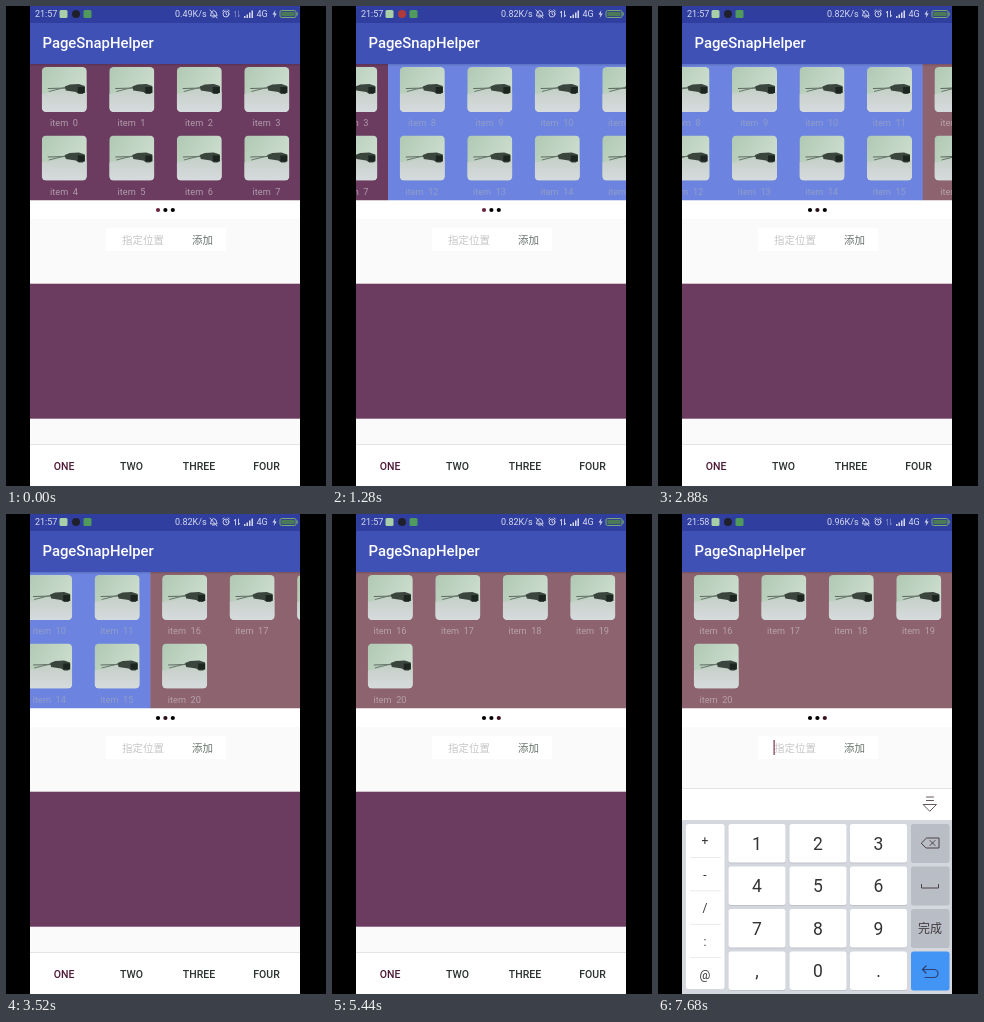
These frames come from a looping animation (320x480 px, 8 s). An HTML page:

```html
<!DOCTYPE html>
<html lang="zh">
<head>
<meta charset="utf-8">
<title>PageSnapHelper</title>
<style>
html, body { margin: 0; width: 100%; height: 100%; overflow: hidden; background: #000; }
svg { display: block; width: 100%; height: 100%; }
text { font-family: Roboto, "Noto Sans CJK SC", "Noto Sans CJK", sans-serif; }
.mid { text-anchor: middle; }
.line { fill: none; stroke-linecap: round; stroke-linejoin: round; }
</style>
</head>
<body>
<svg viewBox="0 0 320 480">
  <defs>
    <clipPath id="screen"><rect x="24" width="270" height="480"/></clipPath>
    <clipPath id="pager"><rect x="24" y="57" width="270" height="137.500"/></clipPath>
    <clipPath id="thumb"><rect width="45" height="45" rx="4.500"/></clipPath>
    <linearGradient id="wall" x1="0" y1="0" x2="1" y2=".6">
      <stop offset="0" stop-color="#b0c9b3"/><stop offset="1" stop-color="#cfdfd1"/>
    </linearGradient>
    <linearGradient id="floor" x1="0" y1="0" x2="0" y2="1">
      <stop offset="0" stop-color="#c6d0c9"/><stop offset="1" stop-color="#d6dbdd"/>
    </linearGradient>
    <linearGradient id="shade" x1="0" y1="0" x2="0" y2="1">
      <stop offset="0" stop-color="#000" stop-opacity=".15"/><stop offset="1" stop-color="#000" stop-opacity="0"/>
    </linearGradient>
    <g id="photo" clip-path="url(#thumb)">
      <rect width="45" height="45" fill="url(#wall)"/>
      <path d="M0 27 22 23 45 25V45H0Z" fill="url(#floor)"/>
      <path d="M6 21.500 25 21" stroke="#5d6a61" stroke-width="1.200"/>
      <path d="M7 24.500 25 20" stroke="#68756c"/>
      <path d="M23 19.500 28 17.500 37 17 43 19V25L41 27H37L34 25 24 23.500Z" fill="#3a453e"/>
      <path d="M36 20h7v6h-7z" fill="#1d2520"/>
    </g>
  </defs>
  <rect width="320" height="480"/>
  <g clip-path="url(#screen)">
    <rect x="24" width="270" height="480" fill="#fafafa"/>
    <g clip-path="url(#pager)"><g id="pages"></g></g>
    <rect x="24" y="58" width="270" height="2.500" fill="url(#shade)"/>
    <rect x="24" y="194.500" width="270" height="18.500" fill="#fff"/>
    <g id="dots"></g>

    <rect x="24" width="270" height="17.500" fill="#303f9f"/>
    <rect x="24" y="17" width="270" height="41" fill="#3f51b5"/>
    <text x="36.500" y="42.300" font-size="14.850" font-weight="500" fill="#fff">PageSnapHelper</text>
    <g font-size="9" fill="#d5d9ee">
      <text id="clock" x="29" y="11.300"></text>
      <text id="rate" x="169" y="11.300"></text>
      <text x="250.500" y="11.300">4G</text>
    </g>
    <rect x="53.500" y="4" width="8" height="8" rx="1.500" fill="#a9cfa8"/>
    <circle id="badge" cx="70" cy="8" r="4"/>
    <rect x="77.500" y="4" width="8" height="8" rx="1.500" fill="#4f9a5c"/>
    <g class="line" stroke="#d5d9ee" stroke-width=".9">
      <path d="M204.500 9.500 205.500 6Q207.500 3 210 6L211 9.500ZM206.500 11h2M204 4 211 12"/>
      <circle cx="220" cy="8" r="3"/>
      <path d="M220 6.500V8l1 1M216.700 5 218 4M223.300 5 222 4"/>
      <path id="net" d="M229.500 11V5l-1 1.500M232.500 5v6l1-1.500"/>
    </g>
    <path d="M238 12v-2h1.500v2zM240.500 12V8.500h1.500V12zM243 12V6.500h1.500V12zM245.500 12V4.500h1.500V12z" fill="#d5d9ee"/>
    <path d="M269.500 4 266.500 8.500h2l-.8 3.500 3-4.500h-2z" fill="#d5d9ee"/>
    <rect x="274" y="4.500" width="16" height="7" rx="1.500" fill="#35458f" stroke="#75a873"/>
    <rect x="275.500" y="6" width="13" height="4" fill="#4b7a56"/>
    <rect x="290.500" y="6.500" width="1.200" height="3" fill="#75a873"/>

    <rect x="100" y="222" width="120" height="23" fill="#fff"/>
    <text x="116" y="237.700" font-size="10.500" fill="#c6c6c8">指定位置</text>
    <text x="186" y="237.700" font-size="10.500" fill="#68736c">添加</text>
    <rect id="caret" x="115.500" y="226" width="1.200" height="15" fill="#7b3550"/>

    <rect x="24" y="277.700" width="270" height="135" fill="#6b3b60"/>
    <rect x="24" y="438.500" width="270" height="41.500" fill="#fff"/>
    <rect x="24" y="438" width="270" height="1" fill="#e3e3e5"/>
    <g id="tabs" class="mid" font-size="10.500" font-weight="500"></g>
    <g id="keys"></g>
  </g>
</svg>
<script>
const LOOP = 8000, STEP = 320, PAGE = 270, CELL = 67.5;
const $ = id => document.getElementById(id);
const smooth = (t, start, length) => {
  const u = Math.min(1, Math.max(0, (t - start) / length));
  return u * u * (3 - 2 * u);
};
const rect = (x, y, w, h, fill, rx = 0) =>
  `<rect x="${x}" y="${y}" width="${w}" height="${h}" rx="${rx}" fill="${fill}"/>`;
const label = (x, y, s, size, fill) =>
  `<text class="mid" x="${x}" y="${y}" font-size="${size}" fill="${fill}">${s}</text>`;
const line = (d, color, width = 1) =>
  `<path class="line" d="${d}" stroke="${color}" stroke-width="${width}"/>`;

function buildPages() {
  let out = ['#6b3b60', '#6c84e0', '#8d6370']
    .map((c, i) => rect(24 + i * PAGE, 57, PAGE + .5, 138, c)).join('');
  const ink = ['#b09dab', '#919dc8', '#b7a2aa'];
  for (let i = 0; i <= 20; i++) {
    const page = Math.floor(i / 8), row = Math.floor(i % 8 / 4);
    const x = 24 + page * PAGE + i % 4 * CELL, y = 61 + row * 68.5;
    out += `<use href="#photo" x="${x + 11.8}" y="${y}"/>` +
      label(x + 34, y + 59, `item&#160; ${i}`, 9.2, ink[page]);
  }
  $('pages').innerHTML = out;
}

function buildKeys() {
  const dark = '#4b4046', cols = [70.5, 131.5, 192], rows = [310, 352.5, 395, 437.5];
  let out = rect(24, 274, 270, 32, '#fff') + rect(24, 274, 270, .8, '#dcdce0') +
    rect(24, 306, 270, 174, '#d4d7dd') +
    line('M268.5 283h7M268.500 286.500h7M265.500 290.500h13L272 297Z', '#66565e') +
    rect(28, 310, 38.5, 165, '#fff', 2.5);
  [...'+-/:@'].forEach((c, i) => {
    if (i) out += rect(32, 309.7 + i * 33.4, 31, .7, '#e2e2e5');
    out += label(47, 331 + i * 33.6, c, 12, '#333');
  });
  [...'123456789,0.'].forEach((c, i) => {
    const x = cols[i % 3], y = rows[Math.floor(i / 3)];
    out += rect(x, y + 1, 57, 38.5, '#bfc2c9', 2.5) + rect(x, y, 57, 38.5, '#fff', 2.5) +
      label(x + 28.5, y + 25.5, c, 17.5, '#333');
  });
  rows.forEach((y, i) => {
    out += rect(253, y, 38.5, 39, i < 3 ? '#b9bdc5' : '#4294f5', 2.5);
  });
  out += line('M263.500 329 268.500 324H281V334H268.500ZM272 326.500l5 5M277 326.500l-5 5', dark) +
    line('M263.500 370.500v3.500h17v-3.500', dark) +
    label(272, 419, '完成', 12, '#40383d') +
    line('M268 452 264.500 455.500 268 459M264.500 455.500H276a3.800 3.800 0 0 1 0 8H267', '#2c4075', 1.2);
  $('keys').innerHTML = out;
}

buildPages();
buildKeys();
$('tabs').innerHTML = ['ONE', 'TWO', 'THREE', 'FOUR']
  .map((s, i) => `<text x="${58 + i * 67.5}" y="463.5" fill="${i ? '#2b332e' : '#4c1a36'}">${s}</text>`).join('');
$('dots').innerHTML = [0, 1, 2]
  .map(i => `<circle cx="${152 + i * 7.4}" cy="204" r="2.1"/>`).join('');
const dots = $('dots').children;

function draw(time) {
  // The picture advances in fixed steps.
  const t = Math.floor(time / STEP) * STEP;
  const scroll = PAGE * (smooth(t, 0, 1630) + smooth(t, 2485, 1930));
  $('pages').setAttribute('transform', `translate(${-scroll} 0)`);

  const active = t < 1600 ? 0 : t < 4480 ? 1 : 2;
  ['#6b2440', '#2a0e1a', '#3a0f1e'].forEach((c, i) =>
    dots[i].setAttribute('fill', i === active ? c : '#000'));

  $('clock').textContent = t < 6080 ? '21:57' : '21:58';
  $('rate').textContent = (t < 320 ? '0.49' : t < 7040 ? '0.82' : '0.96') + 'K/s';
  $('net').setAttribute('opacity', t < 320 || t >= 7040 ? .4 : 1);
  $('badge').setAttribute('fill', t === 1280 ? '#b03a3a' : '#20202c');

  const typing = t >= 6400;
  $('caret').style.display = typing ? '' : 'none';
  $('keys').style.display = typing ? '' : 'none';
  const left = 1 - Math.min(1, Math.max(0, (t - 6400) / 960));
  $('keys').setAttribute('transform', `translate(0 ${138 * left * left})`);
}

const begin = performance.now();
function tick() {
  draw((performance.now() - begin) % LOOP);
  requestAnimationFrame(tick);
}
draw(0);
requestAnimationFrame(tick);
</script>
</body>
</html>
```
